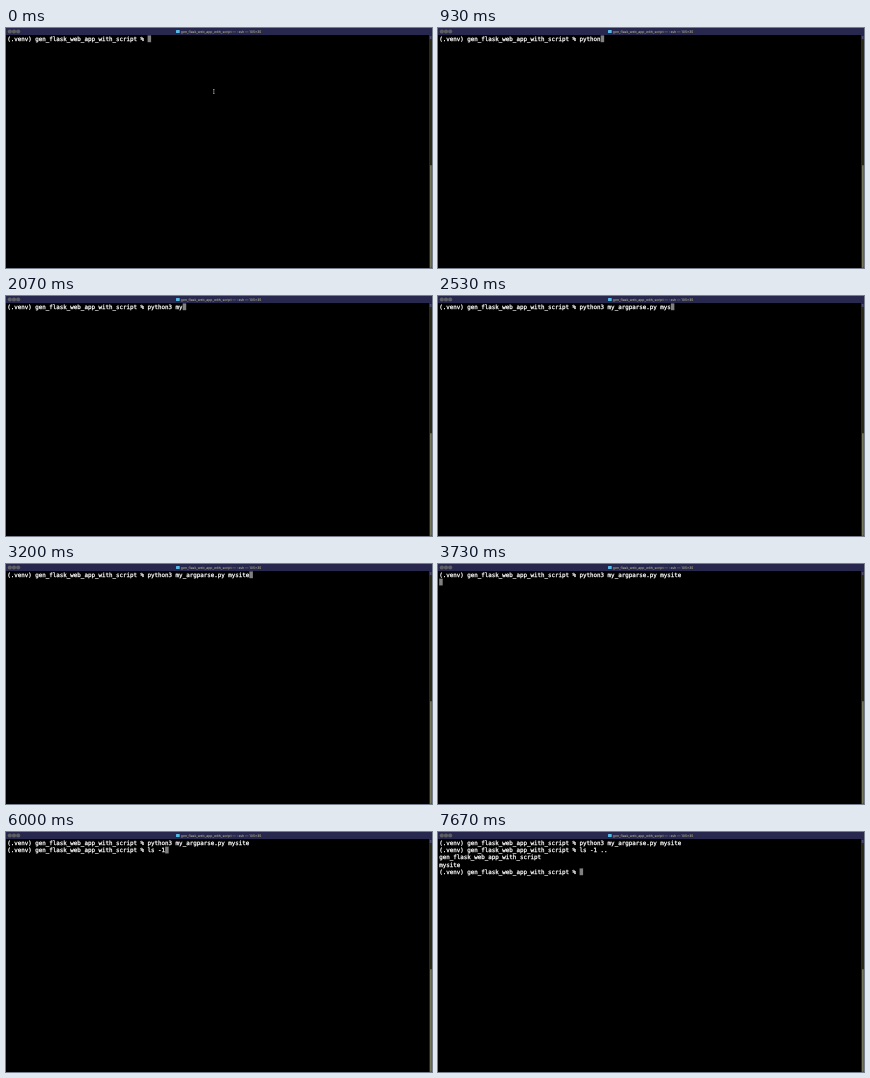
Write an HTML page that moves like this. It is 426 by 240 pixels and loops after 8 s.

```html
<!DOCTYPE html>
<html lang="en">
<head>
<meta charset="utf-8">
<title>Terminal session</title>
<style>
  html, body { margin: 0; width: 100%; height: 100%; overflow: hidden; background: #000; }
  svg { display: block; width: 100vw; height: 100vh; }
  text { text-rendering: geometricPrecision; white-space: pre; }
  .line {
    font: 5.83px "DejaVu Sans Mono", monospace;
    fill: #fff; stroke: #fff; stroke-width: .25px;
  }
  .title { font: 500 3.4px Inter, sans-serif; fill: #b9b483; }
</style>
</head>
<body>
<svg viewBox="0 0 426 240" preserveAspectRatio="none">
  <rect width="426" height="240"/>
  <rect width="426" height="7" fill="#28284e"/>
  <g fill="#5e5e62">
    <circle cx="3.8" cy="3.5" r="2.1"/>
    <circle cx="8" cy="3.5" r="2.1"/>
    <circle cx="12.2" cy="3.5" r="2.1"/>
  </g>
  <rect x="170" y="2" width="3.7" height="3" rx=".5" fill="#55b9e6"/>
  <text class="title" x="174.8" y="4.7">gen_flask_web_app_with_script — -zsh — 105×35</text>

  <rect x="423" y="7" width="3" height="233" fill="#2a2a16"/>
  <rect x="423.8" y="8" width="1.7" height="3" fill="#4c4c70"/>
  <rect x="424" y="137" width="1.8" height="103" rx=".9" fill="#77775c"/>

  <g id="screen"></g>
  <rect id="cursor" width="3.5" height="6.8" fill="#808080"/>
  <path id="pointer" d="M207 61.5h1.6M207.8 61.5v4M207 65.5h1.6" fill="none" stroke="#bbb" stroke-width=".6"/>
</svg>
<script>
const LOOP = 8000, LEFT = 1.2, TOP = 7.4, CHAR = 3.51, ROW = 7.25;
const PROJECT = "gen_flask_web_app_with_script";
const PROMPT = `(.venv) ${PROJECT} % `;

// Each entry is [time, text added to the terminal].
const events = [
  [0, PROMPT],
  [270, "p"], [400, "y"], [530, "t"], [600, "h"], [730, "o"], [870, "n"],
  [1200, "3"], [1400, " "],
  [1800, "m"], [1930, "y"], [2130, "_argparse.py "],
  [2270, "m"], [2400, "y"], [2530, "s"],
  [2670, "i"], [2800, "t"], [2930, "e"],
  [3670, "\n"], [3870, PROMPT],
  [4600, "l"], [5000, "s"], [5200, " "], [5730, "-"], [6000, "1"],
  [6530, " "], [6870, "."], [6930, "."],
  [7530, `\n${PROJECT}\nmysite\n${PROMPT}`]
];

const $ = id => document.getElementById(id);
const rows = Array.from({ length: 5 }, (_, i) => {
  const row = document.createElementNS("http://www.w3.org/2000/svg", "text");
  row.setAttribute("class", "line");
  row.setAttribute("x", LEFT);
  row.setAttribute("y", TOP + 5.4 + i * ROW);
  return $("screen").appendChild(row);
});

let shown = null;

function draw(now) {
  const t = now % LOOP;
  const output = events.filter(([at]) => at <= t).map(e => e[1]).join("");
  if (output !== shown) {
    shown = output;
    const lines = output.split("\n");
    const last = lines.length - 1;
    rows.forEach((row, i) => row.textContent = lines[i] || "");
    $("cursor").setAttribute("x", LEFT + lines[last].length * CHAR);
    $("cursor").setAttribute("y", TOP + last * ROW);
    // The mouse pointer hides once typing begins.
    $("pointer").style.display = output === PROMPT ? "" : "none";
  }
}

const start = performance.now();
function tick() {
  draw(performance.now() - start);
  requestAnimationFrame(tick);
}
tick();
</script>
</body>
</html>
```
